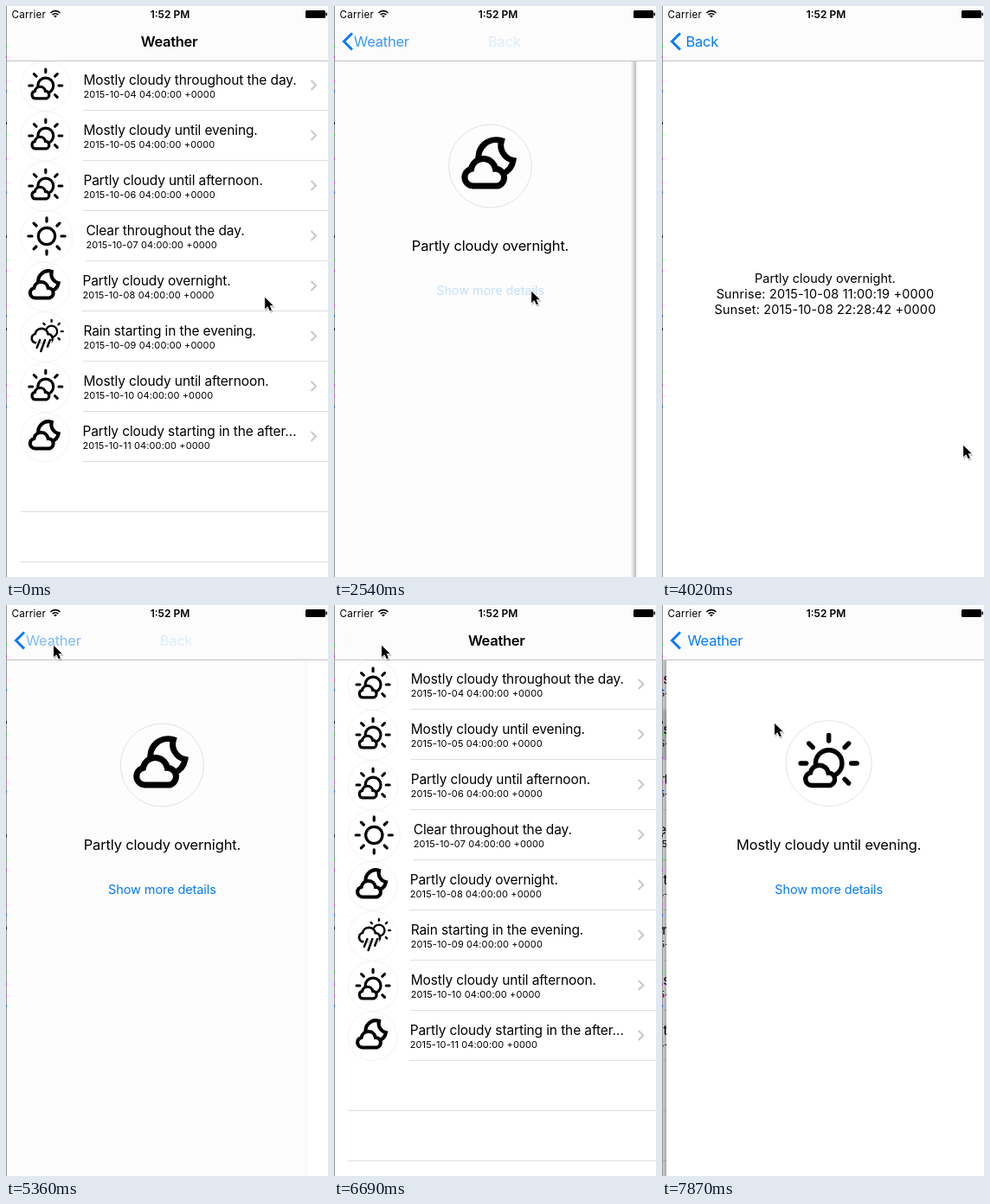
These frames come from a looping animation (372 by 660 pixels, 8000 ms). An HTML page:

```html
<!DOCTYPE html>
<html lang="en">
<head>
<meta charset="utf-8">
<title>Weather list</title>
<style>
html, body { margin: 0; width: 100%; height: 100%; overflow: hidden; background: #fff; }
svg { display: block; width: 372px; height: 660px; }
text { font-family: Inter, Roboto, sans-serif; white-space: pre; }
.row { font-size: 15.5px; letter-spacing: -.12px; }
.date { font-size: 11px; letter-spacing: .12px; }
.head { font-size: 16.5px; letter-spacing: -.16px; }
.link { font-size: 14.5px; letter-spacing: -.1px; fill: #007aff; }
.info { font-size: 14.5px; }
.sun-times { font-size: 14.5px; letter-spacing: .15px; }
.nav { font-size: 16.5px; letter-spacing: -.25px; fill: #007aff; }
.title { font-size: 16.5px; font-weight: 600; letter-spacing: -.3px; }
.carrier { font-size: 11.7px; letter-spacing: .2px; }
.clock { font-size: 12px; font-weight: 600; }
.mid { text-anchor: middle; }
.line { fill: none; stroke: #000; }
</style>
</head>
<body>
<svg viewBox="0 0 372 660">
  <defs>
    <linearGradient id="fade">
      <stop offset="0" stop-opacity="0"/>
      <stop offset="1" stop-opacity=".27"/>
    </linearGradient>
    <path id="cloud" stroke="#000" fill="#fff"
      d="M-20 23A10 10 0 0 1-22 3.3A14.2 14.2 0 0 1 6 3.3A10 10 0 0 1 8.5 23Z"/>
    <g id="moon">
      <path class="line" stroke-width="7" d="M-13-5A20.3 20.3 0 0 1 13-29.3A18 18 0 0 0 26.5-6.5A20.3 20.3 0 0 1 14 9"/>
      <use href="#cloud" stroke-width="7"/>
    </g>
    <g id="partly"></g>
    <g id="clear"></g>
    <g id="rain"></g>
  </defs>

  <rect width="372" height="660" fill="#fff"/>
  <g id="list"></g>
  <rect id="listDim" width="372" height="660"/>
  <g id="day">
    <rect class="shadow" x="-6" y="64" width="7" height="596" fill="url(#fade)"/>
    <rect x="1" width="375" height="660" fill="#fff"/>
    <circle id="dayRing" cx="188.5" fill="#fff" stroke="#ddd" stroke-width=".8"/>
    <use id="dayIcon"/>
    <text id="dayText" class="head mid" x="188.5" y="283"></text>
    <text id="more" class="link mid" x="188.5" y="334">Show more details</text>
  </g>
  <rect id="dayDim" width="372" height="660"/>
  <g id="info">
    <rect class="shadow" x="-6" y="64" width="7" height="596" fill="url(#fade)"/>
    <rect x="1" width="375" height="660" fill="#fff"/>
    <text class="info mid" x="188.5" y="320">Partly cloudy overnight.</text>
    <text class="sun-times mid" x="188.5" y="338">Sunrise: 2015-10-08 11:00:19 +0000</text>
    <text class="sun-times mid" x="188.5" y="355.5">Sunset: 2015-10-08 22:28:42 +0000</text>
  </g>

  <rect width="372" height="63" fill="#fcfcfc"/>
  <rect y="63" width="372" height="1" fill="#c4c4c4"/>
  <text class="carrier" x="6.5" y="13.5">Carrier</text>
  <path class="line" stroke-width="1.7" d="M51.5 8A7.6 7.6 0 0 1 62.5 8M53.7 10.2A4.7 4.7 0 0 1 60.3 10.2"/>
  <path d="M55.2 11.4Q57 10.2 58.8 11.4L57 13.4Z"/>
  <text class="clock mid" x="189.5" y="13.5">1:52 PM</text>
  <rect x="346" y="5" width="23" height="9" rx="1.5"/>
  <rect x="369.5" y="7.5" width="1.5" height="4" rx=".7"/>
  <text id="title" class="title" y="47">Weather</text>
  <path id="arrow" fill="none" stroke="#007aff" stroke-width="3" d="M21 31.5L11.5 41L21 50.5"/>
  <text id="toList" class="nav" y="47">Weather</text>
  <text id="toDay" class="nav" y="47">Back</text>

  <g id="gutter"><rect width="1" height="660" fill="#999"/></g>
  <g id="cursor">
    <path d="M1.7 2v15l3.5-3.2 2.3 5 3-1.3-2.2-4.8h4.8z" opacity=".25"/>
    <path d="M.7 0v15l3.5-3.2 2.3 5 3-1.3-2.2-4.8h4.3z" stroke="#fff" stroke-width=".9"/>
  </g>
</svg>
<script>
const el = id => document.getElementById(id);
const add = (id, markup) => el(id).insertAdjacentHTML('beforeend', markup);

// Icons share one sun: a ring with rays at multiples of 45 degrees.
const sun = (ring, width, from, to, rays) =>
  `<circle class="line" r="${ring}" stroke-width="${width}"/>` + rays.map(i =>
    `<path class="line" stroke-width="${width}" stroke-linecap="round" d="M${from} 0H${to}" transform="rotate(${i * 45})"/>`).join('');
const sideRays = [-4, -3, -2, -1, 0, 1];
const cloud = (x, y, scale, width) =>
  `<use href="#cloud" transform="translate(${x} ${y}) scale(${scale})" stroke-width="${width / scale}"/>`;

add('partly', sun(15.3, 5.4, 26, 32.5, sideRays) + cloud(-5, 8.5, .74, 5.4));
add('clear', sun(16.5, 5.5, 29, 36, [0, 1, 2, 3, 4, 5, 6, 7]));
const drops = 'M-11 7L-17 22M-1 7L-9 29M9 7L4 20';
add('rain', `<g transform="translate(12 -10) scale(.66)">${sun(17, 6, 29, 34, sideRays)}</g>`
  + cloud(-.5, -8, .9, 4.6)
  + `<path d="${drops}" stroke="#fff" stroke-width="9"/>`
  + `<path class="line" d="${drops}" stroke-width="4.3" stroke-linecap="round"/>`);

const ringSize = { partly: 28.8, moon: 28.2, clear: 30, rain: 28.6 };
const days = [
  ['partly', 'Mostly cloudy throughout the day.'],
  ['partly', 'Mostly cloudy until evening.'],
  ['partly', 'Partly cloudy until afternoon.'],
  ['clear', 'Clear throughout the day.'],
  ['moon', 'Partly cloudy overnight.'],
  ['rain', 'Rain starting in the evening.'],
  ['partly', 'Mostly cloudy until afternoon.'],
  ['moon', 'Partly cloudy starting in the after…']
];
add('list', '<rect id="picked" x="1" width="375" height="57" fill="#d9d9d9"/>');
for (let i = 0; i < 10; i++) {
  const y = 64 + i * 58;
  let left = 17;
  if (days[i]) {
    const [icon, text] = days[i], r = ringSize[icon];
    left = Math.round(31.5 + 2 * r);
    add('list', `<circle cx="${17 + r}" cy="${y + 28.5}" r="${r}" fill="#fff" stroke="#efefef" stroke-width=".8"/>
      <use href="#${icon}" transform="translate(${17 + r} ${y + 28}) scale(.585)"/>
      <text class="row" x="${left + .4}" y="${y + 27}">${text}</text>
      <text class="date" x="${left + .4}" y="${y + 42}">2015-10-${String(i + 4).padStart(2, '0')} 04:00:00 +0000</text>
      <path d="M352.5 ${y + 22}l5.5 5.5l-5.5 5.5" fill="none" stroke="#c7c7cc" stroke-width="2"/>`);
  }
  add('list', `<rect x="${left}" y="${y + 56}" width="${376 - left}" height="1" fill="#dedede"/>`);
}

// Slivers of the desktop showing left of the window.
const specks = ['#4b4', '#d5b', '#222', '#a4c', '#36c'];
[45, 58, 85, 97, 134, 148, 175, 203, 214, 265, 292, 305, 345, 357, 372, 422, 437, 450, 462].forEach((y, i) =>
  add('gutter', `<rect y="${y}" width="1" height="3" fill="${specks[i * 3 % 5]}"/>`));

const ticks = [0, 150, 300, 450, 600, 750, 900, 2100, 2250, 2400, 2540, 2690, 2840, 2980, 3130, 3270,
  4020, 4170, 4470, 4620, 4760, 4910, 5210, 5360, 5500, 5650, 6240, 6390, 6540, 6690, 6840, 6980,
  7130, 7280, 7570, 7720, 7870];
// Pointer path: time, x, y
const path = [[0, 298, 336], [150, 299, 334], [1950, 299, 334], [2540, 227, 329], [3130, 230, 331],
  [3270, 350, 540], [3900, 350, 540], [4020, 347, 507], [4170, 162, 185], [4320, 162, 185],
  [4910, 54, 46], [6690, 54, 46], [7280, 129, 136], [8000, 129, 136]];

function pointer(t) {
  const i = path.findIndex(k => k[0] > t);
  const [a, b] = [path[i - 1], path[i]];
  const u = (t - a[0]) / (b[0] - a[0]), e = u * u * (3 - 2 * u);
  return [a[1] + (b[1] - a[1]) * e, a[2] + (b[2] - a[2]) * e];
}

// Critically damped slide from 0 to 1.
function slide(t, start) {
  const s = Math.max(0, t - start) * .0217;
  return 1 - (1 + s) * Math.exp(-s);
}

const clamp = v => Math.min(1, Math.max(0, v));
const move = (id, x, y = 0) => el(id).setAttribute('transform', `translate(${x} ${y})`);
const alpha = (id, v) => el(id).setAttribute('opacity', clamp(v));

function place(id, x, shade) {
  el(id).style.display = x > 372 ? 'none' : '';
  move(id, x);
  el(id).querySelector('.shadow').setAttribute('opacity', shade);
}

const dayBack = 6360, infoBack = 5162;

function draw(t) {
  const p = clamp(slide(t, 432) - slide(t, dayBack) + slide(t, 7570));
  const q = clamp(slide(t, 2520) - slide(t, infoBack));
  const second = t > 7000;
  const closingDay = t > dayBack && !second, closingInfo = t > infoBack;

  move('list', -112.5 * p);
  place('day', 375 * (1 - p) - 112.5 * q, closingDay ? p : 1);
  place('info', 375 * (1 - q), closingInfo ? q : 1);
  alpha('listDim', .1 * p);
  alpha('dayDim', .1 * q);

  const row = second ? 1 : 4;
  el('picked').setAttribute('y', 64 + row * 58);
  alpha('picked', second ? t >= 7570 : t < 150 ? 0 : closingDay ? p : 1);

  const y = second ? 183 : 185;
  el('dayRing').setAttribute('cy', y);
  el('dayRing').setAttribute('r', second ? 49.5 : 48);
  el('dayIcon').setAttribute('href', second ? '#partly' : '#moon');
  move('dayIcon', 188.5, y);
  el('dayText').textContent = days[row][1];
  alpha('more', t >= 2540 && t < 3130 ? .22 : 1);

  const press = t >= 6240 && t < dayBack ? .3 : 1;
  move('title', 155.7 - 127 * p);
  alpha('title', 1 - 2 * p);
  alpha('arrow', p * press);
  move('toList', 28 + 129 * (1 - p) - 70 * q);
  alpha('toList', p * press * (1 - q * (closingInfo ? 7 : 3.2)));
  move('toDay', 189.5 - 162 * q);
  alpha('toDay', 1.6 * q);
  move('cursor', ...pointer(t));
}

const begin = performance.now();
function run() {
  const t = (performance.now() - begin) % 8000;
  draw(ticks.filter(k => k <= t).pop());
  requestAnimationFrame(run);
}
run();
</script>
</body>
</html>
```
